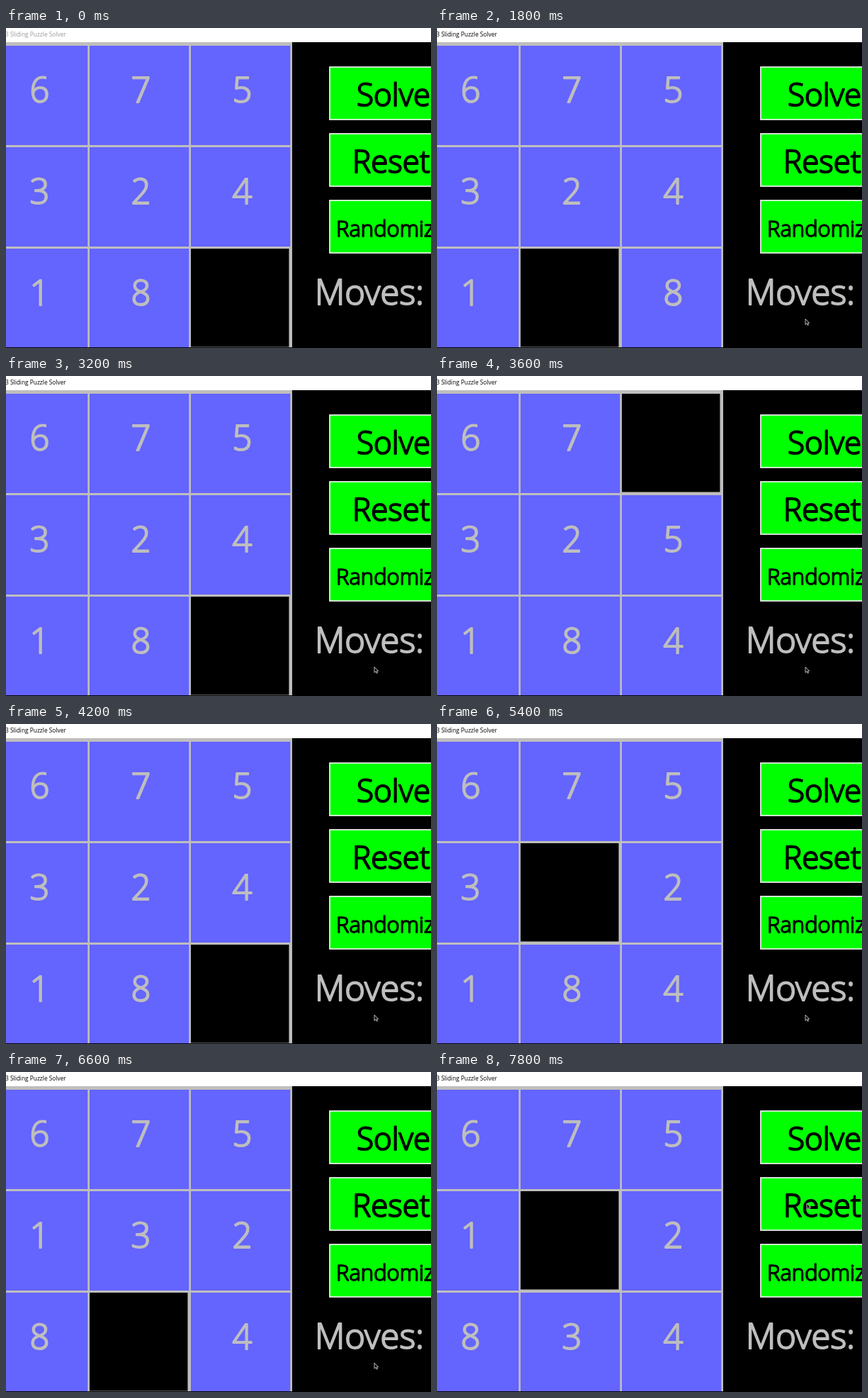
Animation of 600x451 px, one loop 8000 ms. Source, as an HTML page:

```html
<!DOCTYPE html>
<html lang="en">
<head>
<meta charset="utf-8">
<title>Sliding Puzzle</title>
<style>
  html, body { margin: 0; width: 100%; height: 100%; overflow: hidden; background: #000; }
  svg { display: block; width: 100%; height: 100%; }
  text { font-family: "Open Sans", sans-serif; }
  .hand {
    font-weight: 300;
    stroke-linejoin: round;
    stroke-width: 2;
    fill: currentColor;
    stroke: currentColor;
  }
  .silver { color: #bebebe; }
  .ink { color: #000; }
  .tile rect { fill: #6464ff; }
  .tile text { font-size: 49px; text-anchor: middle; }
  .button { fill: #0f0; stroke: #fff; stroke-width: 1.6; }
  #caption { font-size: 8.35px; }
</style>
</head>
<body>
<svg viewBox="0 0 600 451">
  <rect width="600" height="451"/>
  <rect width="600" height="20" fill="#fff"/>
  <text id="caption" x="-1" y="11.5">3 Sliding Puzzle Solver</text>

  <rect x="-30" y="20" width="434" height="430" fill="#bebebe"/>
  <rect id="gap" width="138.5" height="138.5"/>
  <g id="tiles"></g>
  <rect y="450" width="404" height="1"/>

  <rect class="button" x="457" y="55" width="180" height="74"/>
  <rect class="button" x="457" y="149" width="180" height="74"/>
  <rect class="button" x="457" y="243" width="180" height="74"/>
  <g class="hand ink">
    <text x="495" y="110" font-size="44">Solve</text>
    <text x="489" y="204" font-size="44">Reset</text>
    <text x="466" y="294" font-size="31" stroke-width="1.6">Randomize</text>
  </g>
  <text class="hand silver" x="436" y="390" font-size="49">Moves:</text>
  <path id="cursor" d="M0 0V8L2 6.3L3.3 9L4.6 8.4L3.4 5.8H5.6Z" fill="#111" stroke="#ddd" stroke-width=".8"/>
</svg>
<script>
const LOOP = 8000, STEP = 200, PITCH = 143, LEFT = -25, TOP = 25;
const START = [6, 7, 5, 3, 2, 4, 1, 8, 0];
const SHIFT = { L: -1, R: 1, U: -3, D: 3 };

// Direction in which the empty cell travels, and when.
const moves = [
  [1600, 'L'], [2200, 'L'], [2800, 'R'], [3200, 'R'],
  [3400, 'U'], [3600, 'U'], [3800, 'D'], [4000, 'D'],
  [4600, 'U'], [5200, 'L'], [5600, 'L'], [6000, 'D'],
  [6600, 'R'], [7000, 'U']
];

// Pointer positions: time, x, y.
const pointer = [
  [0, 620, 440], [600, 590, 432], [1000, 560, 418], [1600, 520, 410],
  [7200, 520, 410], [7400, 526, 360], [7600, 526, 262], [7800, 522, 185], [8000, 522, 185]
];

const byId = id => document.getElementById(id);
const place = (node, x, y) => node.setAttribute('transform', `translate(${x} ${y})`);
const placeInCell = (node, cell) =>
  place(node, LEFT + cell % 3 * PITCH, TOP + Math.floor(cell / 3) * PITCH);

byId('tiles').innerHTML = [1, 2, 3, 4, 5, 6, 7, 8].map(n =>
  `<g class="tile"><rect width="140.3" height="140"/>
   <text class="hand silver" x="72.5" y="79.5">${n}</text></g>`).join('');
const pieces = [byId('gap'), ...byId('tiles').children];

function boardAt(time) {
  const board = [...START];
  let empty = board.indexOf(0);
  for (const [when, direction] of moves) {
    if (when > time) break;
    const next = empty + SHIFT[direction];
    [board[empty], board[next]] = [board[next], 0];
    empty = next;
  }
  return board;
}

function pointerAt(time) {
  const i = pointer.findIndex(([when]) => when > time);
  const [t0, x0, y0] = pointer[i - 1], [t1, x1, y1] = pointer[i];
  const k = (time - t0) / (t1 - t0);
  return [x0 + (x1 - x0) * k, y0 + (y1 - y0) * k];
}

function draw(now) {
  const time = Math.floor(now % LOOP / STEP) * STEP;
  boardAt(time).forEach((n, cell) => placeInCell(pieces[n], cell));
  place(byId('cursor'), ...pointerAt(time));
  byId('caption').setAttribute('fill', time < 1000 ? '#999' : '#000');
}

function tick() {
  draw(performance.now());
  requestAnimationFrame(tick);
}
tick();
</script>
</body>
</html>
```
